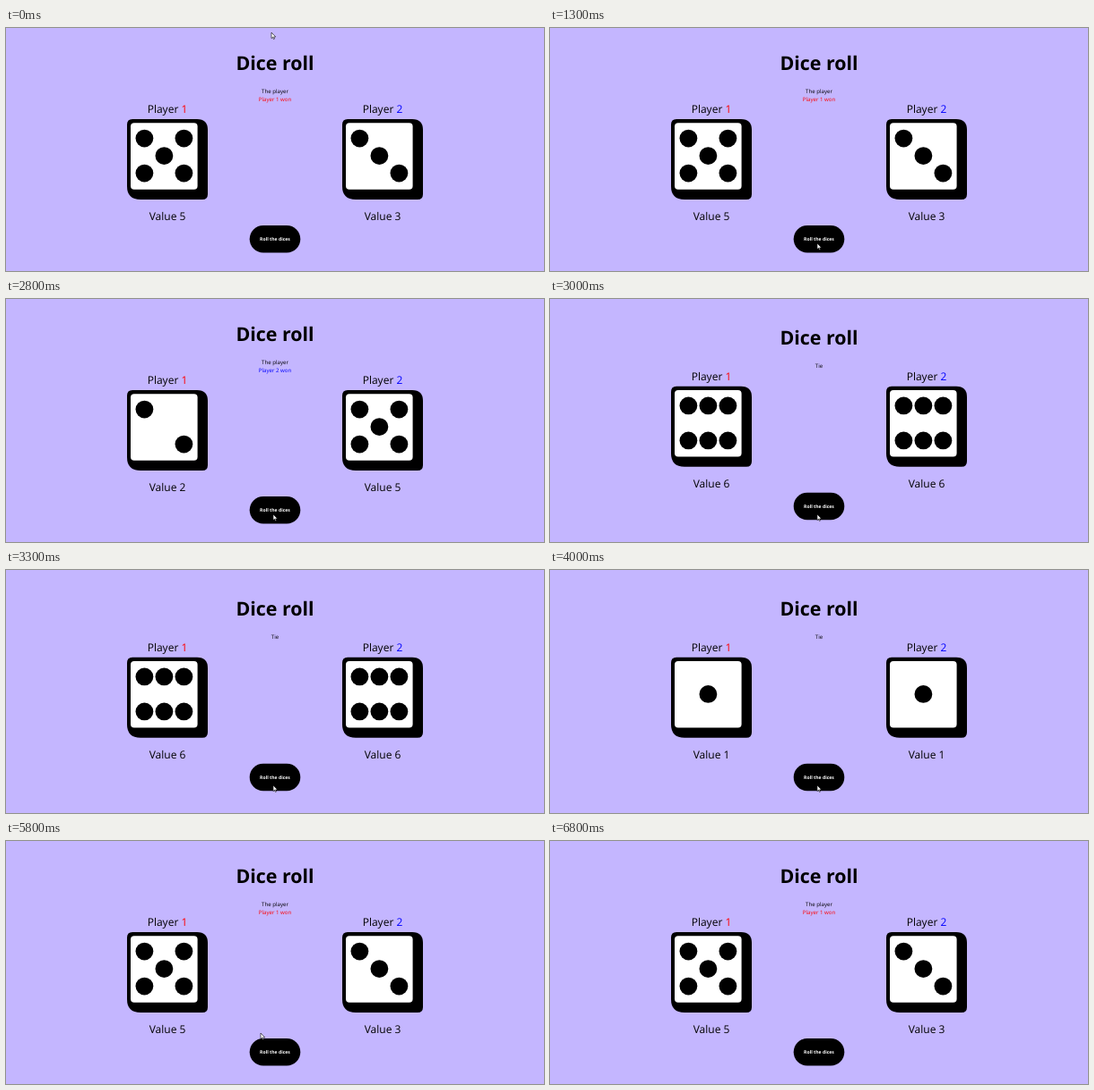
Recreate the animation shown at these times as an HTML page. Size 600 by 272 pixels, loop 7.5 s.

```html
<!DOCTYPE html>
<html lang="en">
<head>
<meta charset="utf-8">
<title>Dice roll</title>
<style>
  html, body { margin: 0; width: 100%; height: 100%; overflow: hidden; background: #c4b6ff; }
  svg { display: block; width: 600px; height: 272px; }
  text { font-family: "Open Sans", "Noto Sans", sans-serif; text-anchor: middle; text-rendering: geometricPrecision; }
  .big { font-size: 12px; }
  .small { font-size: 6.1px; }
  .bold { font-weight: 700; }
</style>
</head>
<body>
<svg viewBox="0 0 600 272">
  <g id="head">
    <text class="bold" x="300" y="47" font-size="21.4">Dice roll</text>
    <text class="small" id="intro" x="300" y="73"></text>
    <text class="small" id="winner" x="300" y="81.5"></text>
  </g>
  <g id="body">
    <g id="dice"></g>
    <rect x="271.7" y="221" width="56.6" height="30.4" rx="15.2"/>
    <text class="bold" x="300" y="238" font-size="5.1" fill="#fff">Roll the dices</text>
  </g>
  <path id="cursor" d="M0 0V6.6L1.5 5.2 2.5 7.5 3.5 7.1 2.6 4.9H4.7Z" fill="#fff" stroke="#000" stroke-width=".6"/>
</svg>
<script>
const LOOP = 7500;
const SHIFT = 4.2; // a tie message is one line shorter, so everything closes in
const COLORS = ["red", "blue"];

// Each pip is a column and row on a 3 x 3 grid.
const FACES = ["", "11", "00 22", "00 11 22", "00 20 02 22", "00 20 11 02 22", "00 10 20 02 12 22"];

// time, first die, second die
const ROLLS = [[0, 5, 3], [1500, 1, 5], [2300, 2, 5], [3000, 6, 6], [4000, 1, 1], [4800, 5, 3]];

// time, x, y
const MOVES = [
  [0, 296, 5], [300, 297, 231], [1000, 298, 241], [5500, 298, 239],
  [5800, 284, 215], [6000, 217, 153], [6500, 270, 6], [6800, -20, -20]
];

const $ = id => document.getElementById(id);
const at = (steps, t) => steps.findLast(step => step[0] <= t);

$("dice").innerHTML = COLORS.map((color, i) => `
  <g transform="translate(${i * 240})">
    <text class="big" x="180" y="95.3">Player <tspan fill="${color}">${i + 1}</tspan></text>
    <path d="M141 102H213Q225 102 225 114V186Q225 192 219 192H150Q135 192 135 177V108Q135 102 141 102Z"/>
    <rect x="139" y="106.2" width="74.6" height="74.6" rx="4" fill="#fff"/>
    <g id="pips${i}"></g>
    <text class="big" id="value${i}" x="180" y="215.3"></text>
  </g>`).join("");

function pips(value) {
  return FACES[value].split(" ").map(([col, row]) =>
    `<circle cx="${154.4 + 22 * col}" cy="${123.6 + 19.5 * row}" r="9.9"/>`).join("");
}

function showRoll([, ...values]) {
  const [a, b] = values;
  const tie = a === b;
  const best = a > b ? 0 : 1;
  values.forEach((value, i) => {
    $("pips" + i).innerHTML = pips(value);
    $("value" + i).textContent = "Value " + value;
  });
  $("intro").textContent = tie ? "Tie" : "The player";
  $("winner").textContent = tie ? "" : `Player ${best + 1} won`;
  $("winner").setAttribute("fill", COLORS[best]);
  $("head").setAttribute("transform", `translate(0 ${tie ? SHIFT : 0})`);
  $("body").setAttribute("transform", `translate(0 ${tie ? -SHIFT : 0})`);
}

let shown;
const start = performance.now();

function draw() {
  const t = (performance.now() - start) % LOOP;
  const roll = at(ROLLS, t);
  if (roll !== shown) showRoll(shown = roll);
  const [, x, y] = at(MOVES, t);
  $("cursor").setAttribute("transform", `translate(${x} ${y})`);
  requestAnimationFrame(draw);
}
draw();
</script>
</body>
</html>
```
